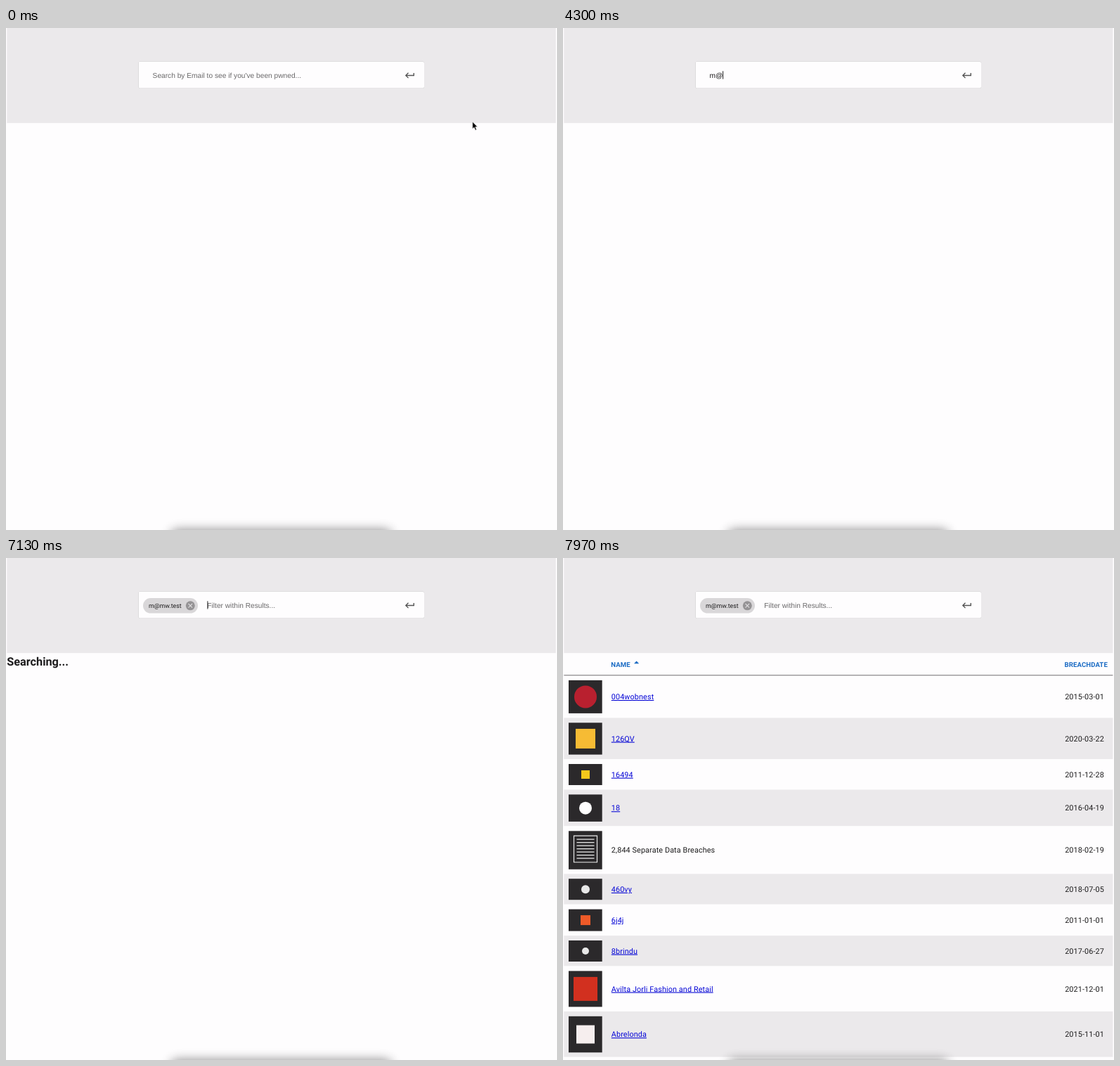
Animation of 784x714 px, one loop 8 s. Source, as an HTML page:

```html
<!DOCTYPE html>
<html lang="en">
<head>
<meta charset="utf-8">
<title>Breach search</title>
<style>
  html, body { margin: 0; width: 100%; height: 100%; overflow: hidden; background: #fefdfe; }
  svg { display: block; width: 100%; height: 100%; overflow: hidden; }
  text { font: 10.8px Roboto, sans-serif; letter-spacing: .0107em; text-rendering: geometricPrecision; fill: #1c1b1c; }
  .field { font: 10.2px "Liberation Sans", Arial, sans-serif; letter-spacing: 0; }
  .hint { fill: #6a696a; }
  #chip .tag { font-size: 8.8px; letter-spacing: 0; }
  #busy { font-size: 16.3px; font-weight: 700; letter-spacing: 0; }
  .head { font: 9.6px "Liberation Sans", Arial, sans-serif; fill: #1c6cc4; letter-spacing: .01em; }
  .ready .head { font: 600 9.6px Roboto, sans-serif; }
  .link { fill: #0505d6; text-decoration: underline; }
  #box { filter: drop-shadow(0 .9px .6px rgba(0, 0, 0, .4)); }
  #dock { filter: blur(8px); }
</style>
</head>
<body>
<svg viewBox="0 0 784 714" preserveAspectRatio="xMinYMin">
  <path d="M1.3 0H782.4V135.2H1.3Z" fill="#ebe9eb"/>
  <rect id="box" x="188.5" y="47.5" width="406.5" height="38.3" rx="2.6" fill="#fefdfe"/>
  <path transform="translate(566.5 59.2) scale(.69)" fill="#555"
    d="M19 7v4H5.83l3.58-3.59L8 6l-6 6 6 6 1.41-1.41L5.83 13H21V7z"/>

  <text id="hint" class="field hint" x="208.6" y="70.6">Search by Email to see if you've been pwned...</text>
  <text id="typed" class="field" x="208.6" y="70.6"></text>

  <g id="chip">
    <rect x="195" y="57" width="78" height="21.6" rx="10.8" fill="#d9d7d9"/>
    <text class="tag" x="203" y="70.8">m@mw.test</text>
    <circle cx="262.3" cy="67.8" r="6.5" fill="#959395"/>
    <path d="M259.5 65l5.6 5.6m0-5.6l-5.6 5.6" stroke="#dddbdd" stroke-width="1.1"/>
    <text class="field hint" x="286.3" y="70.6">Filter within Results...</text>
  </g>

  <text id="busy" x="1.2" y="153.2">Searching...</text>

  <g id="table">
    <text class="head" x="68.3" y="154.6">NAME</text>
    <path d="M101 150.3l3.6-3.8 3.6 3.8z" fill="#1c6cc4"/>
    <text class="head" id="dateHead" y="154.6">BREACHDATE</text>
    <g id="rows"></g>
    <path d="M1.3 166.8H782.4" stroke="#6f6d6f"/>
  </g>

  <path id="caret" d="M0 61.3V72.6"/>
  <path id="arrow" d="M0 0V10.4L2.4 8.2 4.1 12.2 5.9 11.4 4.2 7.6H7.4Z" fill="#000" stroke="#fff" stroke-width=".7"/>
  <path id="beam" d="M-2.1 -5.6Q0 -5.6 0 -4.3Q0 -5.6 2.1 -5.6M0 -4.6V5.2M-2.1 6Q0 6 0 4.7Q0 6 2.1 6M-1.3 2.2H1.3"
    fill="none" stroke="#111" stroke-width="1.1"/>
  <rect id="dock" x="235" y="714" width="313" height="60" rx="8" fill="#000" opacity=".46"/>
</svg>

<script>
const LOOP = 8000, PAD = 6.7, THUMB = 30, TOP = 167;
const EMAIL = 'm@mw.test';
const KEYS = [3600, 4230, 4430, 4600, 4730, 4930, 5070, 5200, 5300];

// name, date, loaded thumbnail height, badge shape, badge size, badge colour
const DATA = [
  ['004wobnest', '2015-03-01', 47, 'circle', 16, '#b9202f'],
  ['126QV', '2020-03-22', 45.3, 'square', 14, '#f6bb34'],
  ['16494', '2011-12-28', 30, 'square', 6, '#f5c81c'],
  ['18', '2016-04-19', 38.5, 'circle', 9, '#fff'],
  ['2,844 Separate Data Breaches', '2018-02-19', 54.5, 'list'],
  ['460vy', '2018-07-05', 30, 'circle', 6, '#e8e8e8'],
  ['6j4j', '2011-01-01', 31, 'square', 7, '#ef5a28'],
  ['8brindu', '2017-06-27', 30, 'circle', 5, '#e8e8e8'],
  ['Avilta Jorli Fashion and Retail', '2021-12-01', 51, 'square', 17, '#d2301f'],
  ['Abrelonda', '2015-11-01', 51.5, 'square', 13, '#f6eeee'],
  ['AdoreMint.Qo', '2016-07-01', 30],
  ['Aflue', '2013-10-04', 30],
  ['Ardent Fig', '2020-10-12', 30],
];

const $ = id => document.getElementById(id);
const show = (el, on) => el.style.display = on ? '' : 'none';
const within = (t, a, b) => t >= a && t < b;
const ease = p => p < .5 ? 4 * p ** 3 : 1 - (2 - 2 * p) ** 3 / 2;
const span = (t, a, b) => ease(Math.min(1, Math.max(0, (t - a) / (b - a))));

function add(parent, tag, attrs, text) {
  const el = document.createElementNS('http://www.w3.org/2000/svg', tag);
  for (const k in attrs) el.setAttribute(k, attrs[k]);
  if (text) el.textContent = text;
  parent.append(el);
  return el;
}

function drawBadge(g, shape, size, fill) {
  if (shape === 'circle') add(g, 'circle', { r: size, fill });
  if (shape === 'square') add(g, 'rect', { x: -size, y: -size, width: 2 * size, height: 2 * size, fill });
  if (shape === 'list') {
    let d = 'M-16.5 -20.5H16.5V17.2H-16.5Z';
    for (let i = 0; i < 7; i++) d += `M-12.5 ${-15.4 + i * 4.5}h25`;
    add(g, 'path', { d, fill: 'none', stroke: '#e8e8e8', 'stroke-width': 1.2 });
  }
}

const rows = DATA.map(([name, date, full, ...badge], i) => {
  const g = add($('rows'), 'g', {});
  const bg = add(g, 'rect', { x: 1.3, width: 781.1, fill: i % 2 ? '#ebe9eb' : '#fefdfe' });
  const thumb = add(g, 'rect', { x: 8, y: PAD + .2, width: 47.7, fill: '#2b292b' });
  const mark = add(g, 'g', {});
  drawBadge(mark, ...badge);
  const label = add(g, 'text', { x: 68.8, class: badge[0] === 'list' ? '' : 'link' }, name);
  const day = add(g, 'text', {}, date);
  return { g, bg, thumb, mark, label, day, full, at: 7570 + i * 38 };
});

function drawTable(t) {
  const ready = t >= 7535;
  $('table').classList.toggle('ready', ready);
  $('dateHead').setAttribute('x', ready ? 713.5 : 708.4);
  let y = TOP;
  for (const r of rows) {
    const loaded = t >= r.at, h = loaded ? r.full : THUMB, rowH = h + 2 * PAD, mid = rowH / 2;
    r.g.setAttribute('transform', `translate(0 ${y})`);
    r.bg.setAttribute('height', rowH);
    r.thumb.setAttribute('height', h);
    r.mark.setAttribute('transform', `translate(32 ${mid + .2})`);
    show(r.mark, loaded);
    r.label.setAttribute('y', mid + 3.8);
    r.day.setAttribute('y', mid + 3.8);
    r.day.setAttribute('x', ready ? 714.2 : 709.3);
    y += rowH;
  }
}

function drawPointer(t) {
  const p = span(t, 400, 1270), q = span(t, 1780, 2010);
  show($('arrow'), t < 1850);
  show($('beam'), within(t, 1850, 3600));
  $('arrow').setAttribute('transform', `translate(${663.7 - 376.4 * p - 48 * q} ${133.2 - 64.4 * p - 1.5 * q})`);
  $('beam').setAttribute('transform', `translate(${287.3 - 48.3 * q} ${70.5 - 3 * q})`);
}

function drawCaret(t) {
  const focus = within(t, 2170, 2670) || within(t, 3170, 3600);
  const typing = within(t, 3600, 5800);
  const filter = within(t, 6130, 6630) || within(t, 7130, 7630);
  const x = focus ? 209 : filter ? 286.9 : 208.8 + (typing ? $('typed').getComputedTextLength() : 0);
  show($('caret'), focus || typing || filter);
  $('caret').setAttribute('transform', `translate(${x} 0)`);
  $('caret').setAttribute('stroke', focus ? '#d2453f' : '#222');
}

function render(t) {
  const sent = t >= 6100, done = t >= 7500;
  show($('hint'), t < 3600);
  show($('typed'), !sent);
  $('typed').textContent = EMAIL.slice(0, KEYS.filter(k => t >= k).length);
  show($('chip'), sent);
  show($('busy'), t >= 6130 && !done);
  show($('table'), done);
  if (done) drawTable(t);
  drawPointer(t);
  drawCaret(t);
}

const start = performance.now();
function tick() {
  render((performance.now() - start) % LOOP);
  requestAnimationFrame(tick);
}
tick();
</script>
</body>
</html>
```
